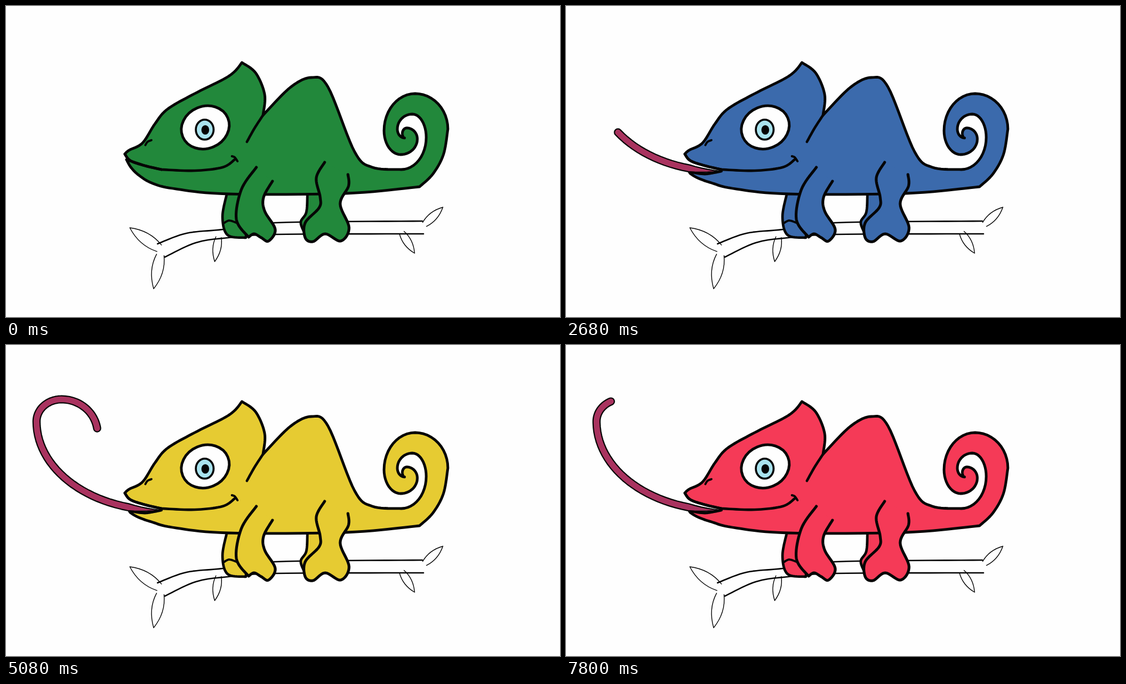
An HTML page with a canvas that plays this animation: 998x561 px, repeating every 8 s.

```html
<!DOCTYPE html>
<html lang="en">
<head>
<meta charset="utf-8">
<title>Chameleon</title>
<style>
  html, body { margin: 0; width: 100%; height: 100%; overflow: hidden; background: #fefefe; }
  canvas { display: block; width: 998px; height: 561px; }
</style>
</head>
<body>
<canvas id="stage"></canvas>
<script>
const W = 998, H = 561, LOOP = 8000;
const canvas = document.getElementById('stage');
const ctx = canvas.getContext('2d');
const ratio = window.devicePixelRatio || 1;
canvas.width = Math.round(W * ratio);
canvas.height = Math.round(H * ratio);
ctx.scale(ratio, ratio);
ctx.lineCap = ctx.lineJoin = 'round';

const PAPER = '#fefefe', INK = '#050505', TONGUE = '#a9335f', IRIS = '#a9e3ee';
const COLORS = {
  green: '#22883b', lilac: '#ccb0e8', blue: '#3b6aac',
  red: '#f53a57', yellow: '#e6cb32', orange: '#f2853a'
};
const SKINS = ('green lilac blue red lilac blue red yellow lilac green ' +
  'yellow orange yellow green blue orange red').split(' ');
const STARTS = [0, 480, 1080, 1640, 2080, 2680, 3160, 3720, 4200, 4680,
  5080, 5560, 6120, 6520, 6960, 7360, 7800];

// tongue length in quarter turns; it rolls back through the same poses
const REACH = [0, 0, 0.065, 0.37, 0.49, 0.62, 0.97, 1.72, 2.1, 2.5, 2.9, 3.9, 5];
const reachAt = step => REACH[step < REACH.length ? step : 23 - step];

const parse = text => text.trim().split(' ').map(p => p.split(',').map(Number));

// smooth curve through points, with a corner at each slash
function curve(text) {
  const out = [];
  for (const run of text.split('/')) {
    const pts = parse(run);
    if (out.length) pts.unshift(out[out.length - 1]);
    else out.push(pts[0]);
    for (let i = 0; i < pts.length - 1; i++) {
      const b = pts[i], c = pts[i + 1], a = pts[i - 1] || b, d = pts[i + 2] || c;
      for (let t = 0.1; t < 1.05; t += 0.1) {
        out.push([0, 1].map(k => b[k] + t / 2 * (c[k] - a[k] +
          t * (2 * a[k] - 5 * b[k] + 4 * c[k] - d[k] + t * (3 * (b[k] - c[k]) + d[k] - a[k])))));
      }
    }
  }
  return out;
}

// point on a chain of quarter ellipses, the first one setting off sideways
function swirlAt(pts, u) {
  const i = Math.min(Math.floor(u), pts.length - 2);
  const angle = (u - i) * Math.PI / 2;
  const ease = [Math.sin(angle), 1 - Math.cos(angle)];
  return [0, 1].map(k => pts[i][k] + (pts[i + 1][k] - pts[i][k]) * ease[(i + k) % 2]);
}

function swirl(text) {
  const pts = parse(text);
  return Array.from({ length: (pts.length - 1) * 12 + 1 }, (_, i) => swirlAt(pts, i / 12));
}

function ink(path, width, fill) {
  if (fill) {
    ctx.fillStyle = fill;
    ctx.fill(path);
  }
  ctx.strokeStyle = INK;
  ctx.lineWidth = width;
  ctx.stroke(path);
}

function draw(points, width, fill) {
  const path = new Path2D();
  points.forEach(p => path.lineTo(...p));
  ink(path, width, fill);
}

function oval(x, y, rx, ry, turn, width, fill) {
  const path = new Path2D();
  path.ellipse(x, y, rx, ry, turn, 0, Math.PI * 2);
  ink(path, width, fill);
}

const TORSO = [
  ...curve('214,267 222,260 246,247 268,213 291,186 340,158 392,132 412,118 425,102 / ' +
    '450,121 466,160 463,197 / 512,147 550,129 580,146 628,263 660,291 712,295'),
  ...swirl('712,295 757,237 732,195 705,222 718,238'),
  ...swirl('718,238 714,230 722,220 741,240 711,268 681,225 737,158 796,222'),
  ...curve('796,222 788,268 769,303 745,326')
];
const LIP = curve('280,295 250,288 224,279 214,267');

const FAR_LEGS = [
  '398,338 390,380 399,413 432,418 / 440,340',
  '543,340 541,372 531,390 538,410 / 566,400 / 575,340'
].map(curve);
const NEAR_LEGS = [
  '451,291 424,331 415,385 437,417 / 447,411 460,418 473,424 485,403 466,370 464,345 480,316',
  '574,282 559,310 566,345 564,364 539,391 539,418 553,425 575,411 603,424 618,400 602,357 617,325 616,304'
].map(curve);
const BRANCH = [
  '273,429 325,410 391,403 484,391 750,388',
  '286,453 342,427 400,418 485,412 752,411'
].map(curve);

// two bowed sides from an open base to the tip
function leaf(x, y, tipX, tipY) {
  const dx = tipX - x, dy = tipY - y;
  const path = new Path2D();
  for (const side of [-1, 1]) {
    const open = side * 0.11, bow = side * 0.26;
    path.moveTo(x - dy * open, y + dx * open);
    path.quadraticCurveTo(x + dx / 2 - dy * bow, y + dy / 2 + dx * bow, tipX, tipY);
  }
  ink(path, 1.4);
}

function drawBranch() {
  BRANCH.forEach(points => draw(points, 2.6));
  leaf(276, 437, 223, 400);
  leaf(278, 449, 266, 510);
  leaf(383, 417, 376, 461);
  leaf(754, 394, 787, 363);
  leaf(713, 409, 736, 446);
}

const TONGUE_PATH = parse('278,298 55,138 100,98 165,160 145,192 127,184');

function drawTongue(reach) {
  const left = [], right = [];
  const count = Math.ceil(reach * 30);
  let tip, half, angle;
  for (let i = 0; i <= count; i++) {
    const u = reach * i / count;
    tip = swirlAt(TONGUE_PATH, u);
    const from = swirlAt(TONGUE_PATH, Math.max(u - 0.02, 0));
    const to = swirlAt(TONGUE_PATH, Math.min(u + 0.02, 5));
    angle = Math.atan2(to[1] - from[1], to[0] - from[0]);
    half = Math.min(u * 38, 6.3) + Math.max(0, Math.min(u - 3, 1)) * 2.4;
    const dx = -Math.sin(angle) * half, dy = Math.cos(angle) * half;
    left.push([tip[0] + dx, tip[1] + dy]);
    right.unshift([tip[0] - dx, tip[1] - dy]);
  }
  const path = new Path2D();
  left.forEach(p => path.lineTo(...p));
  path.arc(...tip, half, angle + Math.PI / 2, angle - Math.PI / 2, true);
  right.forEach(p => path.lineTo(...p));
  path.closePath();
  ink(path, 2.2, TONGUE);
}

function drawBody(skin, jaw) {
  const mouth = curve('745,326 612,338 400,339 300,329 262,319 ' +
    `239,${305 + 6 * jaw} 225,${291 + 12 * jaw} ${217 + 5 * jaw},${277 + 22 * jaw} / ` +
    `250,${288 + 15 * jaw} 280,${295 + 3 * jaw}`);
  draw([...TORSO, ...mouth, ...LIP], 4.8, skin);
  draw(curve('463,197 448,220 434,245'), 4.6);
}

function drawFace() {
  draw(LIP, 4.6);
  draw(curve('280,295 340,297 390,291 412,277'), 4.6);
  draw(curve('407,271 412,273 417,280'), 4);
  draw(curve('251,251 255,245 262,242'), 3.8);
  oval(359, 219, 44, 38, -0.4, 4.8, PAPER);
  oval(358, 223, 16, 18, 0, 3.6, IRIS);
  oval(359, 223.5, 6, 7.5, 0, 2, INK);
}

function drawScene(step) {
  const skin = COLORS[SKINS[step]], reach = reachAt(step);
  ctx.fillStyle = PAPER;
  ctx.fillRect(0, 0, W, H);
  drawBranch();
  FAR_LEGS.forEach(points => draw(points, 4.6, skin));
  draw(curve('392,392 402,387 415,391'), 3.8);
  drawBody(skin, Math.min(step / 2, 1));
  if (reach) drawTongue(reach);
  drawFace();
  NEAR_LEGS.forEach(points => draw(points, 5, skin));
}

let shown = -1;
function tick(now) {
  const t = now % LOOP;
  const step = STARTS.filter(start => start <= t).length - 1;
  if (step !== shown) drawScene(shown = step);
  requestAnimationFrame(tick);
}
tick(0);
</script>
</body>
</html>
```
